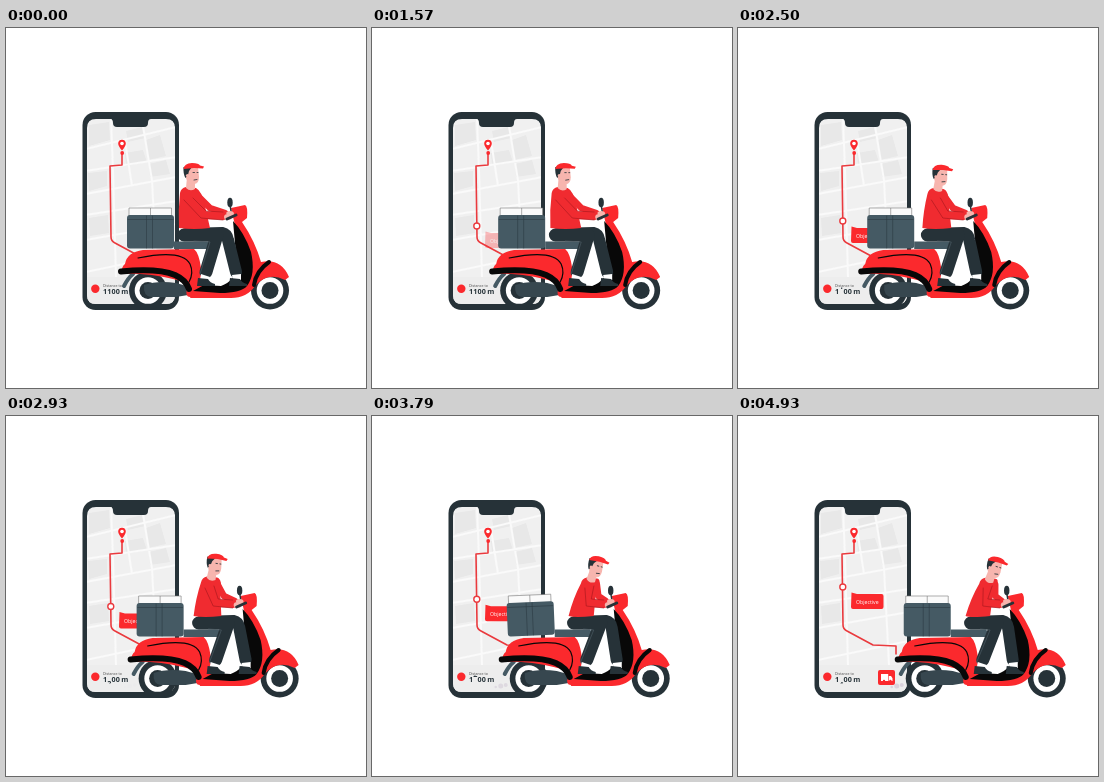
Write an HTML page that moves like this. It is 360 by 360 pixels and loops after 5 s.

```html
<!DOCTYPE html>
<html lang="en">
<head>
<meta charset="utf-8">
<title>Scooter delivery</title>
<style>
  html, body { margin: 0; width: 100%; height: 100%; overflow: hidden; background: #fff; }
  svg { display: block; width: 100vw; height: 100vh; }
  text { font-family: "Open Sans", sans-serif; }
  .red { fill: #fb292d; }
  .shirt { fill: #f02b30; }
  .dark { fill: #263238; }
  .steel { fill: #455a64; }
  .skin { fill: #f7b5ae; }
  .line { fill: none; stroke-linecap: round; stroke-linejoin: round; }
  .route { stroke: #ea3a3e; stroke-width: 1.6; }
  .sleeve { stroke: #f02b30; stroke-width: 8; }
  .seam { stroke: #a3171d; stroke-width: .6; }
  .leg { stroke: #263238; stroke-width: 13; }
</style>
</head>
<body>
<svg viewBox="0 0 360 360">
  <defs>
    <clipPath id="screen"><path d="M81 100Q81 91 90 91H104Q107 91 107 95Q107 99 111 99H138Q142 99 142 95Q142 91 145 91H160Q169 91 169 100V267Q169 276 160 276H90Q81 276 81 267Z"/></clipPath>
    <clipPath id="slot"><rect x="100" y="259.5" width="7" height="8"/></clipPath>
    <g id="wheel">
      <circle r="19" class="dark"/>
      <circle r="13.300" fill="#fff"/>
      <circle r="8.500" class="dark"/>
    </g>
    <path id="shoe" class="dark" d="M-6 -4L4 -3Q6 1 11 2V4H-7Z"/>
  </defs>

  <rect x="76.500" y="84" width="96.500" height="198" rx="13" class="dark"/>
  <g clip-path="url(#screen)">
    <rect x="80" y="90" width="90" height="187" fill="#f0f0f0"/>
    <path fill="#e8e8e8" d="M83 97L103 94 104 112 83 118ZM120 103L136 99 139 110 122 114ZM140 112L154 107 160 128 142 132ZM119 125L137 122 141 134 120 138ZM143 136L160 132 164 146 144 149ZM82 145L101 143V158L83 163ZM83 190L102 187 103 205 84 208Z"/>
    <path fill="none" stroke="#fafafa" stroke-width="2" d="M80 121L170 99M80 143L170 129M80 166L170 149M80 187L170 173M80 212L170 196M80 244L170 225M105 90L107 143 110 249M137 98L146 152 151 249M119 113L126 158"/>
    <path fill="#ededed" d="M80 249H170V277H80Z"/>
    <path class="line route" d="M116 125V137L104 138 105 209Q105 213 109 215L135 229 158 230V238"/>
    <path class="red" d="M116 122.500Q112.200 118 112.200 115.500A3.800 3.800 0 0 1 119.800 115.500Q119.800 118 116 122.500Z"/>
    <circle cx="116" cy="115.500" r="1.800" fill="#fff"/>
    <circle cx="116.200" cy="125" r="1.900" class="red"/>
    <circle id="stop" cx="104.800" r="3" fill="#fff" stroke="#ea3a3e" stroke-width="1.400"/>
    <g id="label">
      <path class="red" d="M113.500 5.500L119 7H143.500Q145.500 7 145.500 9V20Q145.500 22 143.500 22H115Q113 22 113 20Z"/>
      <text x="129.300" y="16.800" font-size="5.200" fill="#fff" text-anchor="middle">Objective</text>
    </g>
    <circle cx="89.300" cy="260.800" r="4.200" class="red"/>
    <text x="97" y="258.800" font-size="3.600" fill="#444">Distance to</text>
    <g font-size="7.200" font-weight="700" class="dark">
      <text x="97" y="266">1</text>
      <g clip-path="url(#slot)"><g id="roll"></g></g>
      <text x="105.600" y="266">00</text>
      <text x="115.300" y="266">m</text>
    </g>
    <rect x="140" y="254" width="17" height="15" rx="2" class="red"/>
    <path fill="#fff" d="M143 258H150.200V265H143ZM150.800 260H153L154.500 262.300V265H150.800Z"/>
    <g class="red"><circle cx="146" cy="265" r="1.200"/><circle cx="152.400" cy="265" r="1.200"/></g>
  </g>

  <g id="scooter">
    <g id="smoke" fill="#d9d2dc">
      <circle cx="119" cy="269" r="2"/><circle cx="114" cy="270" r="2.500"/><circle cx="109" cy="271" r="1.300"/>
    </g>
    <path class="line" stroke="#455a64" stroke-width="4" d="M127 246Q122 250 118 258"/>
    <use href="#wheel" x="142" y="262.500"/>
    <use href="#wheel" x="264" y="262.500"/>
    <path fill="#37474f" d="M138 257Q152 252 170 255L188 260V266L170 269H145Q137 268 138 257Z"/>
    <path class="red" d="M115 245Q116 238 119 236Q121 224 137 222L188 221Q193 225 195 240L201 258 217 262 213 269H184Q179 269 181 261Q180 253 167 251Q143 245 115 246Z"/>
    <path class="line" stroke="#080808" stroke-width="6" stroke-linecap="butt" d="M115 243.500Q152 240 169 247Q180 252 183 261"/>
    <path class="line" stroke="#080808" stroke-width="1.200" d="M132 230Q176 221 184 236Q188 245 183 254"/>
    <path class="steel" d="M168 213.500H203Q208 217 203 221H168Z"/>
    <path class="red" d="M225 180L239 177Q242 178 241 190L236 194Q249 213 255 234Q275 230 283 249L279 252Q262 243 249 258Q241 270 225 270H184L188 262 232 258 238 235 228 193Z"/>
    <path fill="#080808" d="M227 193Q238 204 245 224Q250 246 241 258Q235 265 214 265L187 263 198 257 215 258Q229 253 231 238Z"/>
    <path class="line" stroke="#080808" stroke-width="4" stroke-linecap="butt" d="M263 234Q250 243 248 257"/>
    <path class="line" stroke="#263238" stroke-width="1.500" d="M224 177L226 189"/>
    <ellipse cx="224" cy="174.500" rx="2.700" ry="4.700" class="dark"/>

    <g id="box">
      <path fill="#fafafa" stroke="#777" stroke-width=".6" d="M123 180H165.500V188H123ZM144.500 180V188"/>
      <rect x="121" y="187" width="47" height="33.500" rx="3" class="steel"/>
      <path class="line" stroke="#2c3b43" stroke-width=".6" d="M122 191.500H167M140.500 188V220M146.500 188V220"/>
    </g>

    <path class="line sleeve" id="farArm" style="stroke-width:6.500"/>
    <ellipse cx="224" cy="186" rx="4" ry="3" class="skin"/>
    <path class="line leg" id="farLeg" style="stroke-width:12"/>
    <path fill="#fff" d="M226 247L235 246 235 252 227 253Z"/>
    <use href="#shoe" x="230" y="254"/>
    <path class="line leg" id="nearLeg"/>
    <path class="line" stroke="#4a5a62" stroke-width=".7" id="crease"/>
    <path fill="#fff" d="M195 246L204 249 202 254 194 252Z"/>
    <use href="#shoe" x="198" y="254"/>
    <path class="shirt" id="torso"/>
    <g id="head">
      <path class="skin" d="M181 149H189V161Q184 164 180 160Z"/>
      <path class="skin" d="M179 139H192L193 149Q193 156 188 156Q181 156 179 147Z"/>
      <path class="dark" d="M177.500 139H186L183 143 182 147 179.500 150Q177 146 177.500 139Z"/>
      <circle cx="181.500" cy="147.500" r="1.600" class="skin"/>
      <path class="line" stroke="#263238" stroke-width=".8" d="M187 144.500H188.500M191 144.500H192M188 152L191 151.500"/>
      <path class="red" d="M177.500 141Q178 135.500 186 135Q193 135 194 137.500L198 138.500 197 140.500 188 140Z"/>
    </g>
    <path class="line sleeve" id="nearArm"/>
    <path class="line seam" id="seam"/>
    <ellipse cx="222" cy="189" rx="4" ry="3" class="skin"/>
    <path class="line" stroke="#263238" stroke-width="3" d="M221 191L230 187"/>
  </g>
</svg>
<script>
const $ = id => document.getElementById(id);
const LOOP = 5000;

// Linear interpolation through [time, value] pairs
function track(t, keys) {
  let i = 1;
  while (i < keys.length - 1 && t > keys[i][0]) i++;
  const [t0, a] = keys[i - 1], [t1, b] = keys[i];
  return a + (b - a) * Math.min(1, Math.max(0, (t - t0) / (t1 - t0)));
}
const move = (id, x, y, more = "") => $(id).setAttribute("transform", `translate(${x} ${y}) ${more}`);
const shape = (id, d) => $(id).setAttribute("d", d);

const ROW = 12;
$("roll").innerHTML = [1, 2, 3, 4].map((n, i) => `<text x="101.300" y="${266 + i * ROW}">${n}</text>`).join("");

function drawRider(lean) {
  const s = lean * .8, hip = lean * .35, knee = lean * .12, elbow = lean * .18, drop = lean * .1;
  shape("torso", `M${180 + s} ${159 + drop}L${190 + s} ${160 + drop}Q${196 + s} 163 ${199 + s * .5} 178L${204 + knee} 200
    Q188 202 ${173 + hip} 200Q${172 + (hip + s) / 2} 182 ${174 + s} ${165 + drop}Q${175 + s} ${160 + drop} ${180 + s} ${159 + drop}Z`);
  shape("farArm", `M${190 + s} ${166 + drop}L${204 + lean * .3} 180 219 185`);
  shape("nearArm", `M${181 + s} ${169 + drop}L${198 + elbow} 187 217 188`);
  shape("seam", `M${178 + s} 172L${195 + elbow} 190 217 192M${187 + s} 170L${200 + elbow} 183 217 184`);
  shape("farLeg", `M${180 + hip} 206L${216 + knee} 205Q${221 + knee} 206 ${222 + knee} 212L230 244`);
  shape("nearLeg", `M${178 + hip} 207L${211 + knee} 207 200 244`);
  shape("crease", `M${188 + hip} 213L${204 + knee} 214 194 246`);
  move("head", s, lean * .17, `rotate(${lean * .6} 185 158)`);
}

function draw(t) {
  const dx = track(t, [[0, 0], [3500, 11.5], [3720, 13.2], [4000, 19.2], [4290, 27], [4570, 35.5], [5000, 46.5]]);
  const tilt = track(t, [[3600, 0], [4000, -5], [4290, -9], [4600, -4], [4850, 0]]);
  const stopY = track(t, [[0, 203], [790, 201], [1570, 198], [2500, 193], [3290, 188.5], [4290, 178], [5000, 170.3]]);

  move("scooter", dx, 0);
  move("box", tilt * .2, tilt * .4, `rotate(${tilt} 144.500 204)`);
  drawRider(track(t, [[0, 0], [1500, 0], [2500, 9], [3290, 18.5], [4000, 28], [4290, 29], [5000, 28]]));

  $("stop").setAttribute("cy", stopY);
  $("stop").setAttribute("r", track(t, [[60, 0], [350, 3]]));
  $("stop").style.opacity = t < 70 ? 0 : 1;
  move("label", 0, stopY);
  $("label").style.opacity = track(t, [[1300, 0], [1570, .3], [2200, 1]]);
  move("roll", 0, -track(t, [[1700, 0], [2500, 5], [3290, 10.5], [4290, 23], [5000, 32]]));
  $("smoke").style.opacity = track(t, [[2900, 0], [3300, .6], [4930, 1]]);
}

function tick() {
  draw(performance.now() % LOOP);
  requestAnimationFrame(tick);
}
tick();
</script>
</body>
</html>
```
